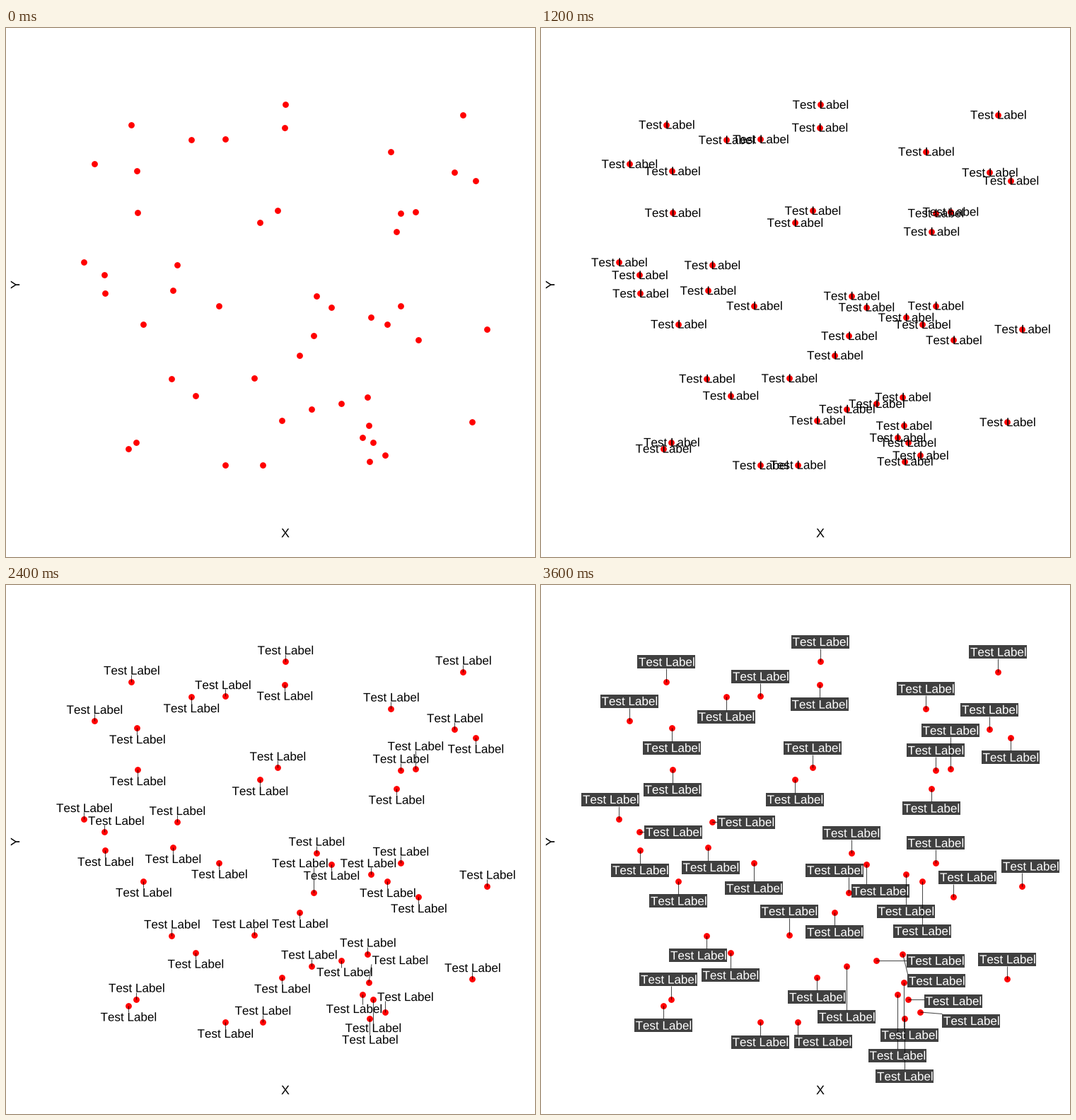
These frames come from a looping animation (748 px wide and 748 px high, 4800 ms). A matplotlib script:

```python
import matplotlib.pyplot as plt
import numpy as np
from matplotlib.animation import FuncAnimation
from matplotlib.collections import LineCollection
from matplotlib.patches import PathPatch, Rectangle
from matplotlib.textpath import TextPath
from matplotlib.transforms import Affine2D

SIZE, DPI = 748, 88
PX = 72 / DPI  # points per pixel
INK = "black"

plt.rcParams["font.family"] = "Liberation Sans"
plt.rcParams["text.kerning_factor"] = 6

points = np.array([
    (395, 108), (394, 140.5), (646.5, 122.5), (177.5, 136.5), (262, 158),
    (310.5, 157), (544.5, 174.5), (125, 192), (185.5, 202), (634.5, 204),
    (664, 215.5), (186, 261), (384, 258), (359, 275), (558, 261.5),
    (579, 259.5), (552, 287.5), (110.5, 331), (139.5, 349), (140.5, 375),
    (242, 335), (236, 371), (301.5, 392.5), (194.5, 418.5), (439, 378.5),
    (460, 394.5), (558, 392.5), (516, 409), (539.5, 419), (583.5, 441),
    (680.5, 425.5), (435.5, 435), (415.5, 462.5), (234.5, 495.5), (268, 519.5),
    (351, 495), (390.5, 554.5), (432.5, 538.5), (474.5, 531), (511.5, 521.5),
    (513, 562), (504, 579), (519, 586), (536.5, 604), (514.5, 612.5),
    (659.5, 557), (184.5, 585.5), (173, 594.5), (310, 618), (363, 617.5),
])

fig = plt.figure(figsize=(SIZE / DPI, SIZE / DPI), dpi=DPI, facecolor="white")
ax = fig.add_axes([0, 0, 1, 1])
ax.set(xlim=(0, SIZE), ylim=(SIZE, 0))
ax.axis("off")


def centred(text, size):
    """Unhinted text outline with its middle at the origin."""
    path = TextPath((0, 0), text, size=size)
    box = path.get_extents()
    middle = (box.x0 + box.x1) / 2, (box.y0 + box.y1) / 2
    return Affine2D().translate(-middle[0], -middle[1]).scale(1, -1).transform_path(path)


def write(path, x, y, color=INK, angle=0):
    place = Affine2D().rotate_deg(-angle).translate(x, y)
    return ax.add_patch(PathPatch(place.transform_path(path), fc=color,
                                  ec="none", zorder=5))


def clear(spots, others, reach):
    """True for each spot that keeps out of reach of all the others."""
    hits = np.abs(spots[:, None] - np.reshape(others, (1, -1, 2))) < reach
    return ~hits.all(axis=2).any(axis=1)


def repel(gap, spacing):
    """Give each point the cheapest free label spot, away from its neighbour."""
    distance = np.hypot(*(points[:, None] - points).T)
    np.fill_diagonal(distance, np.inf)
    nearest = points[distance.argmin(axis=1)]
    sides = np.sign(points[:, 1] - nearest[:, 1])

    dx, dy = (g.ravel() for g in np.meshgrid(np.arange(-120, 121, 4),
                                             np.arange(-110, 111, 2)))
    outside = (abs(dy) >= gap) | (abs(dx) >= 46)
    dx, dy = dx[outside], dy[outside]
    placed = []
    for point, side in zip(points, sides):
        cost = np.hypot(1.2 * dx, dy) + 20 * (dy * side < 0)
        spots = point + np.column_stack([dx, dy])
        free = clear(spots, points, (44, 0.8 * gap)) & clear(spots, placed, spacing)
        placed.append(spots[np.where(free, cost, np.inf).argmin()])
    return np.array(placed)


def labels(spots, color=INK):
    return [write(label_path, x, y, color) for x, y in spots]


def leaders(spots, half):
    """Lines from each point to the closest place on its label's edge."""
    ends = np.clip(points, spots - half, spots + half)
    lines = LineCollection(np.stack([points, ends], axis=1), colors=INK,
                           linewidths=1.07 * PX, alpha=0.7, zorder=3)
    return [ax.add_collection(lines)]


def boxes(spots, half):
    return [ax.add_patch(Rectangle(corner, *(2 * half), fc=INK, ec="none",
                                   alpha=0.75, zorder=4))
            for corner in spots - half]


label_path = centred("Test Label", 17.07)
ax.scatter(*points.T, s=(8.8 * PX) ** 2, c="red", linewidths=0, zorder=2)
write(centred("X", 18), 395, 714)
write(centred("Y", 18), 13, 363, angle=90)

text_spots = repel(gap=16, spacing=(84, 16.5))
box_spots = repel(gap=28, spacing=(86, 28))
text_half = np.array([40, 6.3])
box_half = np.array([41, 9.5])
stages = [
    [],
    labels(points),
    labels(text_spots) + leaders(text_spots, text_half),
    labels(box_spots, "white") + boxes(box_spots, box_half)
    + leaders(box_spots, box_half),
]


def draw(frame):
    for i, stage in enumerate(stages):
        for artist in stage:
            artist.set_visible(i == frame)
    return []


anim = FuncAnimation(fig, draw, frames=len(stages), interval=1200, repeat=True)
plt.show()
```
